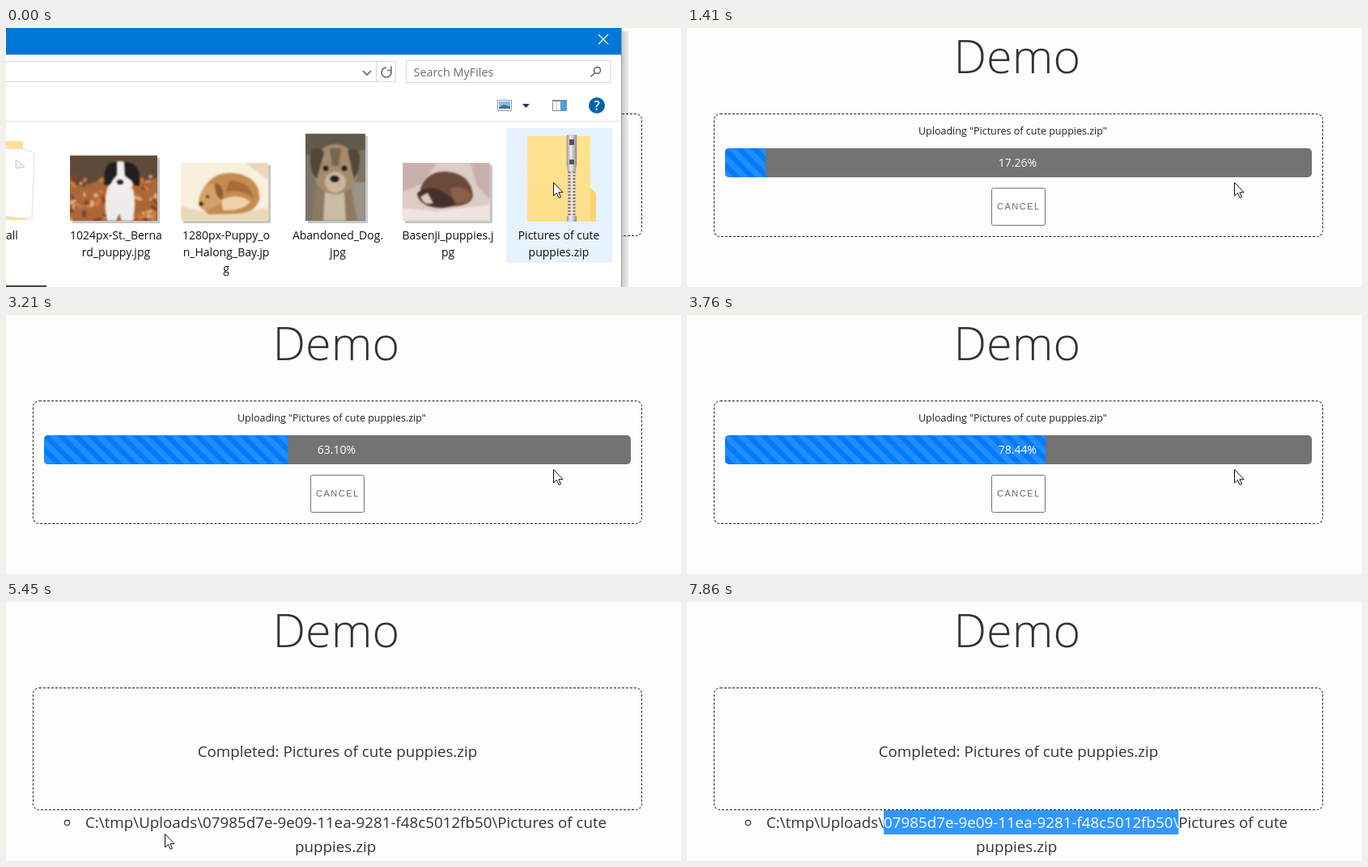
Recreate the animation shown at these times as an HTML page. Size 834 by 321 pixels, loop 8000 ms.

```html
<!DOCTYPE html>
<html lang="en">
<head>
<meta charset="utf-8">
<title>Upload demo</title>
<style>
  html, body { margin: 0; width: 100%; height: 100%; overflow: hidden; background: #fdfdfd; }
  svg.stage { position: absolute; left: 0; top: 0; }
  text { font-family: "Open Sans", sans-serif; fill: #333; white-space: pre; }
  .body { font-size: 18.75px; }
  .label { font-size: 14px; text-anchor: middle; fill: #111; }
  .soft { filter: blur(.8px); }
  #drop { position: absolute; box-sizing: border-box; left: 33px; top: 106px; width: 753px;
          border: 1px dashed #222; border-radius: 8px; }
  #bar { position: absolute; left: 47px; top: 149px; width: 725px; height: 36px;
         border-radius: 5px; background: #737373; overflow: hidden; }
  #fill { height: 100%; background: #007bff linear-gradient(45deg, #fff2 25%, #fff0 25% 50%, #fff2 50% 75%, #fff0 75%);
          background-size: 18.75px 18.75px; }
</style>
</head>
<body>
<div id="drop"></div>
<div id="bar"><div id="fill"></div></div>
<svg class="stage" width="834" height="321" viewBox="0 0 834 321">
  <defs>
    <linearGradient id="shade"><stop stop-color="#000" stop-opacity=".22"/><stop offset="1" stop-color="#000" stop-opacity=".07"/></linearGradient>
    <linearGradient id="fold" x2="0" y2="1"><stop stop-color="#ffe392"/><stop offset="1" stop-color="#fddf88"/></linearGradient>
    <linearGradient id="metal"><stop stop-color="#9b9b9b"/><stop offset=".4" stop-color="#eee"/><stop offset="1" stop-color="#8d8d8d"/></linearGradient>
  </defs>

  <text x="407.8" y="56" font-size="57.5" font-weight="300" text-anchor="middle">Demo</text>
  <text id="hint" class="body" x="409.5" y="192" text-anchor="middle"></text>

  <g id="uploading">
    <text x="286" y="132" font-size="12.5" style="fill:#222">Uploading "Pictures of cute puppies.zip"</text>
    <text id="percent" x="408.5" y="172" font-size="14" text-anchor="middle" style="fill:#fff"></text>
    <rect x="376.5" y="198.5" width="66" height="46" rx="2" fill="#fff" stroke="#6c757d"/>
    <text x="383" y="225" font-size="11" letter-spacing="1.5" style="font-family:'Liberation Sans',sans-serif;fill:#5f6a74">CANCEL</text>
  </g>

  <g id="done">
    <circle cx="75.5" cy="273.5" r="3.2" fill="none" stroke="#333" stroke-width="1.2"/>
    <rect id="mark" y="258" height="30" fill="#3297fd"/>
    <text id="path" class="body" x="98" y="280"><tspan></tspan><tspan style="fill:#fff"></tspan><tspan></tspan></text>
    <text class="body" x="357" y="310">puppies.zip</text>
  </g>

  <g id="dialog">
    <path d="M760 4h9V340H760z" fill="url(#shade)"/>
    <path d="M760.5-5V340" stroke="#999"/>
    <path d="M-20-5H760V340H-20z" fill="#fff"/>
    <path d="M-20-5H760V33H-20z" fill="#0078d7"/>
    <path id="close" d="M732 8l12 12m0-12l-12 12" stroke="#fff" stroke-width="1.2"/>
    <path d="M-20 41.5H481.5V66.5H-20M457.5 41.5v25M494.5 40.5H746.5V67.5H494.5z" fill="none" stroke="#d9d9d9"/>
    <path d="M-20 115.5H759" stroke="#e4e4e4"/>
    <g fill="none" stroke="#666" stroke-width="1.6">
      <path d="M441 53l5 5 5-5"/>
      <path d="M475.4 52.4A6 6 0 1 1 470 49M476 47.5v5h-5"/>
      <circle cx="730.5" cy="52.5" r="4"/><path d="M727.5 55.5l-5 5"/>
    </g>
    <text x="503.5" y="60" font-size="14.4" style="fill:#6d6d6d">Search MyFiles</text>
    <path d="M607.5 89.5h17v13h-17z" fill="#fff" stroke="#999"/>
    <path d="M609 91h14v6h-14z" fill="#7cc0ee"/><path d="M609 98l6-3 8 2v3h-14z" fill="#3f7597"/>
    <path d="M638 94h9l-4.500 5z" fill="#1e395b"/>
    <path d="M675.5 89.5h17v13h-17z" fill="#fff" stroke="#8a8a8a"/>
    <path d="M675 89h18v2h-18z" fill="#8a8a8a"/><path d="M685 91h7v11h-7z" fill="#45a0e6"/><path d="M680.5 91v11" stroke="#ccc"/>
    <circle cx="730" cy="96" r="10" fill="#0063b1"/>
    <text x="730" y="101.5" font-size="16" font-weight="600" text-anchor="middle" style="fill:#fff">?</text>

    <path d="M0 140h21v12h4v86H0z" fill="url(#fold)"/>
    <path d="M-5 149l28 1 12 5-3 82-37-4z" fill="#fff" stroke="#ddd"/>
    <path d="M12 163l11 9-11 2z" fill="#f2f2f2" stroke="#ccc"/>
    <path d="M0 319h50v20H0z" fill="#3c4a35"/>

    <path d="M82 161h108v81H82zM219 170h108v72H219zM373 134h74v108h-74zM493 170h108v72H493z" fill="#000" opacity=".22"/>
    <svg x="79" y="158" width="108" height="81">
      <path d="M0 0h108v81H0z" fill="#a9683c"/>
      <g class="soft">
        <path d="M0 0h108v28L84 32 40 30 14 38 0 34z" fill="#5d4a3b"/>
        <g id="leaves"></g>
        <path d="M46 40q18-8 32 2 5 18-1 39H64l-3-9-4 9H46q-5-20 0-41z" fill="#eeecea"/>
        <ellipse cx="62" cy="27" rx="18" ry="20" fill="#f1eeec"/>
        <path d="M58 8Q40 6 43 36q6 4 10-6l5-6z" fill="#221e20"/>
        <path d="M67 8q22 0 19 29-6 3-10-6l-8-6z" fill="#221e20"/>
        <ellipse cx="62" cy="33" rx="4" ry="3" fill="#222"/>
      </g>
    </svg>
    <svg x="216" y="167" width="108" height="72">
      <path d="M0 0h108v72H0z" fill="#f8efdc"/>
      <g class="soft">
        <path d="M0 54l40 10 68-8v16H0zM80 0h28v22z" fill="#ead9b8"/>
        <path d="M26 36Q38 10 66 13q32 4 31 32-4 17-28 18l-34 1q-12-6-9-28z" fill="#c58a4f"/>
        <path d="M50 46q20-10 36 2-8 12-34 11z" fill="#ecd2a8"/>
        <path d="M60 22q24 0 30 22-14-12-34-8z" fill="#a76d38"/>
        <path d="M22 47q4-22 22-22 13 10 4 26l-16 9q-10-2-10-13z" fill="#d3a067"/>
        <path d="M42 25q13 3 9 21-9-4-9-21z" fill="#8f5b30"/>
        <circle cx="25" cy="51" r="2.500" fill="#35251d"/><circle cx="33" cy="42" r="1.800" fill="#35251d"/>
      </g>
    </svg>
    <svg x="370" y="131" width="74" height="108">
      <path d="M0 0h74v108H0z" fill="#7d7468"/>
      <g class="soft">
        <path d="M0 0h74v20L0 26z" fill="#5f5a4b"/>
        <path d="M50 60h24v48H50z" fill="#9a9388"/>
        <path d="M14 62q24-10 42 2l8 44H8z" fill="#8f7a61"/>
        <path d="M24 70h24l2 38H22z" fill="#c9bba5"/>
        <ellipse cx="37" cy="44" rx="28" ry="31" fill="#a58b6d"/>
        <path d="M7 20q12-6 16 4l-9 32Q3 46 7 20zM52 20q14-5 15 8 1 17-7 28z" fill="#54463a"/>
        <path d="M30 18h14l-3 22h-8z" fill="#7a6650"/>
        <ellipse cx="37" cy="60" rx="13" ry="13" fill="#cdb599"/>
        <ellipse cx="36" cy="56" rx="5.500" ry="4" fill="#211d1b"/>
        <circle cx="25" cy="43" r="3.200" fill="#211d1b"/><circle cx="48" cy="43" r="3.200" fill="#211d1b"/>
      </g>
    </svg>
    <svg x="490" y="167" width="108" height="72">
      <path d="M0 0h108v72H0z" fill="#dccbc6"/>
      <g class="soft">
        <path d="M0 0h42L24 26 0 36zM84 0h24v45L92 28z" fill="#c7b0ab"/>
        <path d="M0 56l40 4 68-8v20H0z" fill="#efe4e0"/>
        <path d="M22 32Q30 10 54 11q30 2 33 30-2 12-24 13-40 4-41-22z" fill="#6b493b"/>
        <path d="M18 38q12-11 28-4l22 14q-12 12-34 6-14-4-16-16z" fill="#43302a"/>
        <path d="M22 42l9-5 7 13q-12 4-16-8z" fill="#dccabf"/>
        <path d="M58 32q18-6 28 9-6 12-22 8z" fill="#8a6049"/>
      </g>
    </svg>

    <rect id="tile" x="618.5" y="124.5" width="130" height="166"/>
    <path d="M644 135q0-1 1-1h77v64l7 7v35h-85z" fill="url(#fold)"/>
    <path d="M722 198l7 7v35h-7z" fill="#f8d472"/>
    <path d="M693 134h12v106h-12z" fill="#e3d8c4"/>
    <path d="M699 178v56" stroke="#8d7552" stroke-width="9" stroke-dasharray="2 2"/>
    <path d="M699 178v56" stroke="#e9e3d8" stroke-width="3"/>
    <path d="M693 133h12v36l-2 9h-8l-2-9z" fill="url(#metal)" stroke="#999" stroke-width=".6"/>
    <path d="M696 138h6v7h-6zM696 163h6v6h-6z" fill="#555"/>
    <path d="M693 233h12v7h-12z" fill="url(#metal)"/>
    <g id="labels"></g>
  </g>

  <path id="cursor" d="M.5.5V17l4-3.500 2.600 6 2.400-1-2.600-5.800h5.200z" fill="#fff" stroke="#111"/>
</svg>
<script>
const $ = id => document.getElementById(id);
const SVG = "http://www.w3.org/2000/svg";
const LOOP = 8000;
const BEATS = [560, 1710, 2760, 3910, 5030, 6130, 7210, 8400]; // eight steps between beats
const UPLOAD = 3, DONE = 29, SELECT = 39, LAST = 49;
const PERCENT = [[3, 7.26], [6, 17.26], [14, 43.93], [23, 78.44], [29, 100]];
const FILL = [[3, 0], [6, 6.95], [14, 25.2], [23, 54.65], [29, 74]];
const CURSOR_X = [[28, 676], [31, 457], [35, 196], [36, 196], [39, 234], [47, 589], [49, 607]];
const CURSOR_Y = [[28, 191], [31, 295], [32, 297], [35, 287], [36, 287], [39, 265], [47, 262], [49, 258]];
const FULL_PATH = "C:\\tmp\\Uploads\\07985d7e-9e09-11ea-9281-f48c5012fb50\\Pictures of cute";
const SELECT_FROM = 15, SELECT_TO = 52;
const LABELS = [
  [-3, "Small"], [136, "1024px-St._Berna", "rd_puppy.jpg"], [272, "1280px-Puppy_o", "n_Halong_Bay.jp", "g"],
  [410, "Abandoned_Dog.", "jpg"], [546, "Basenji_puppies.j", "pg"], [683, "Pictures of cute", "puppies.zip"]
];

function add(parent, tag, attrs, text = "") {
  const el = document.createElementNS(SVG, tag);
  for (const name in attrs) el.setAttribute(name, attrs[name]);
  el.textContent = text;
  parent.append(el);
}

for (const [x, ...lines] of LABELS)
  lines.forEach((line, i) => add($("labels"), "text", { class: "label", x, y: 262 + 20.5 * i }, line));

let seed = 7;
const random = () => (seed = seed * 16807 % 2147483647) / 2147483647;
for (let i = 0; i < 110; i++) {
  const x = random() * 108, y = 26 + random() * 55;
  add($("leaves"), "ellipse", {
    rx: 2 + random() * 4, ry: 1 + random() * 2,
    fill: ["#cf7a3c", "#7d4526", "#b8622c", "#dca878"][i % 4],
    transform: `translate(${x} ${y}) rotate(${random() * 180})`
  });
}

function track(points, k) {
  if (k <= points[0][0]) return points[0][1];
  for (let i = 1; i < points.length; i++) {
    const [k0, v0] = points[i - 1], [k1, v1] = points[i];
    if (k <= k1) return v0 + (v1 - v0) * (k - k0) / (k1 - k0);
  }
  return points.at(-1)[1];
}

function stepAt(t) {
  const i = BEATS.findLastIndex(beat => t >= beat);
  if (i < 0) return -1;
  const step = Math.floor((t - BEATS[i] + 25) / (BEATS[i + 1] - BEATS[i]) * 8);
  return Math.min(LAST, 8 * i + Math.min(7, step));
}

const show = (id, visible) => $(id).style.display = visible ? "" : "none";

function drawDialog(t, k) {
  const n = k + 1;
  show("dialog", k < 2);
  show("close", k < 0);
  $("dialog").setAttribute("opacity", k < 0 ? 1 : k < 1 ? .545 : .1);
  $("dialog").setAttribute("transform", `translate(${1.8 * n} ${5.6 * n}) scale(${1 - .02 * n})`);
  $("tile").setAttribute("fill", t < 150 ? "#e5f3ff" : "#cce8ff");
  $("tile").setAttribute("stroke", t < 150 ? "#e5f3ff" : "#99d1ff");
}

function drawSelection(k, cursorX) {
  const path = $("path"), [before, chosen, after] = path.children;
  before.textContent = FULL_PATH;
  chosen.textContent = after.textContent = "";
  const left = i => path.getStartPositionOfChar(i).x;
  const from = left(SELECT_FROM);
  let end = SELECT_FROM;
  if (k > SELECT) while (end < SELECT_TO && (left(end) + left(end + 1)) / 2 < cursorX) end++;
  $("mark").setAttribute("x", from);
  $("mark").setAttribute("width", left(end) - from);
  before.textContent = FULL_PATH.slice(0, SELECT_FROM);
  chosen.textContent = FULL_PATH.slice(SELECT_FROM, end);
  after.textContent = FULL_PATH.slice(end);
}

function draw(t) {
  const k = stepAt(t), uploading = k >= UPLOAD && k < DONE, done = k >= DONE;
  const x = track(CURSOR_X, k), y = track(CURSOR_Y, k);
  drawDialog(t, k);
  show("bar", uploading);
  show("uploading", uploading);
  show("hint", !uploading);
  show("done", done);
  $("drop").style.height = (uploading ? 153 : 152) + "px";
  $("hint").textContent = done ? "Completed: Pictures of cute puppies.zip" : "Drag and Drop files here";
  $("percent").textContent = track(PERCENT, k).toFixed(2) + "%";
  $("fill").style.width = track(FILL, k) + "%";
  $("fill").style.backgroundPositionX = -18.75 * (k * .14 % 1) + "px";
  if (done) drawSelection(k, x);
  show("cursor", t < 7860);
  $("cursor").setAttribute("transform", `translate(${Math.round(x)} ${Math.round(y)})`);
}

function frame(now) {
  draw(now % LOOP);
  requestAnimationFrame(frame);
}
draw(0);
requestAnimationFrame(frame);
</script>
</body>
</html>
```
